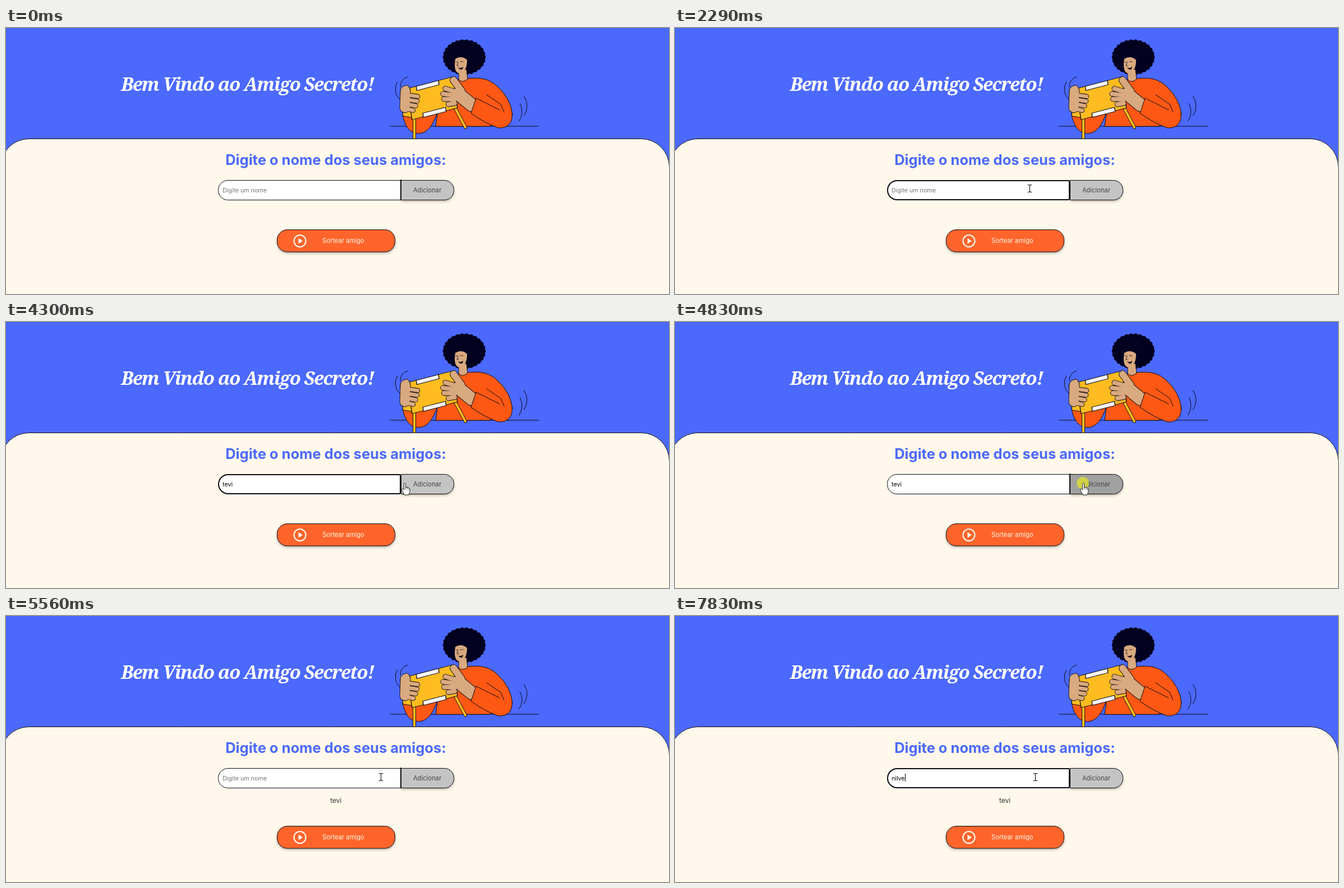
These frames come from a looping animation (1182 px wide and 474 px high, 8000 ms). An HTML page with a canvas:

```html
<!DOCTYPE html>
<html lang="pt-BR">
<head>
<meta charset="utf-8">
<title>Amigo Secreto</title>
<style>
html, body { margin: 0; width: 100%; height: 100%; overflow: hidden; background: #4b69fd; }
canvas { display: block; }
</style>
</head>
<body>
<canvas id="stage" width="1182" height="474"></canvas>
<script>
const ctx = document.getElementById('stage').getContext('2d');
const LOOP = 8000, TICK = 200 / 3;
const INK = '#0b0a14', SKIN = '#d9a97f', ORANGE = '#ff5814', YELLOW = '#ffbc20';
const SANS = 'Inter, "Liberation Sans", sans-serif';

// Pointer glides, each easing out with its own power
const START = { x: 964, y: 447 };
const glides = [
  { from: 460, to: 600, x: 728, y: 373, power: 2 },
  { from: 910, to: 1430, x: 632, y: 286, power: 4 },
  { from: 3940, to: 4500, x: 728, y: 287, power: 2 },
  { from: 5450, to: 5770, x: 642, y: 287, power: 4 }
];
// Each focus lasts until blur; letters follow at a steady gap
const entries = [
  { name: 'tevi', focus: 1800, blur: 4830, keys: 2700, gap: 240 },
  { name: 'nilve', focus: 6210, blur: LOOP, keys: 6970, gap: 215 }
];
const clicks = [
  { from: 1760, to: 1960, x: 632 },
  { from: 4830, to: 4900, x: 727 },
  { from: 6180, to: 6440, x: 641 }
];
const ADDED = 4900;

function pointerAt(t) {
  if (t < glides[0].from) return null;
  const now = Math.floor((t + 8) / TICK) * TICK;
  let { x, y } = START;
  for (const g of glides) {
    const p = Math.min(1, Math.max(0, (now - g.from) / (g.to - g.from)));
    const k = 1 - (1 - p) ** g.power;
    x += (g.x - x) * k;
    y += (g.y - y) * k;
  }
  return { x: Math.round(x), y: Math.round(y) };
}

function path(d, fill, stroke = INK, width = 1) {
  const p = new Path2D(d);
  if (fill) { ctx.fillStyle = fill; ctx.fill(p); }
  if (stroke) { ctx.strokeStyle = stroke; ctx.lineWidth = width; ctx.stroke(p); }
}

function oval(x, y, rx, ry, fill) {
  ctx.fillStyle = fill;
  ctx.beginPath();
  ctx.ellipse(x, y, rx, ry, 0, 0, Math.PI * 2);
  ctx.fill();
}

function text(str, x, y, font, color, align = 'left', spacing = 0) {
  ctx.font = font;
  ctx.fillStyle = color;
  ctx.textAlign = align;
  ctx.letterSpacing = spacing + 'px';
  ctx.fillText(str, x, y);
}

function box(x, y, w, h, radii, fill, line = 1, shadow = false) {
  ctx.beginPath();
  ctx.roundRect(x + line / 2, y + line / 2, w - line, h - line, radii);
  ctx.save();
  if (shadow) {
    ctx.shadowColor = 'rgba(0,0,0,.35)';
    ctx.shadowBlur = 5;
    ctx.shadowOffsetY = 2;
  }
  ctx.fillStyle = fill;
  ctx.fill();
  ctx.restore();
  ctx.strokeStyle = INK;
  ctx.lineWidth = line;
  ctx.stroke();
}

// Round-ended bars that share one outline
function bars(list, color) {
  for (const edge of [1.8, 0]) {
    for (const [x1, y1, x2, y2, w] of list) {
      path(`M${x1} ${y1}L${x2} ${y2}`, null, edge ? INK : color, w + edge);
    }
  }
}

function head() {
  const hair = '#030020', curls = 26;
  oval(817, 52, 36, 30, hair);
  for (let i = 0; i < curls; i++) {
    const a = i / curls * Math.PI * 2;
    oval(817 + 33.5 * Math.cos(a), 52 + 27 * Math.sin(a), 4.8, 4.8, hair);
  }
  path('M807 76V92Q814 99 823 91L821 74Z', SKIN);
  path('M801 55Q797 80 809 81Q822 78 822 57Q812 48 801 55Z', SKIN, null);
  path('M805 70Q810 73 815 69Q814 79 805 70Z', '#190b18', null);
  path('M802 61L805 60M810 60H815M806 61L804 67H807', null, INK, .8);
}

function parcel() {
  bars([[728, 160, 728, 205, 4], [802, 145, 819, 177, 4]], YELLOW);
  path('M703 112L716 105L726 160L708 157Z', YELLOW);
  ctx.save();
  ctx.transform(81, -21, 8, 57, 716, 108);
  const panels = [[0, 0, 1, .97, YELLOW], [.19, 0, .49, .13, '#f6f4f4'], [.25, .86, .5, .13, '#f6f4f4']];
  for (const [x, y, w, h, fill] of panels) path(`M${x} ${y}h${w}v${h}h${-w}Z`, fill, INK, .016);
  ctx.restore();
}

function hands() {
  const left = [[712, 112, 711, 142, 17], [711, 116, 714, 107, 9]];
  const right = [[807, 118, 830, 137, 23], [812, 112, 798, 93, 12]];
  for (let i = 0; i < 4; i++) {
    const y = 122 + i * 8.3;
    left.push([714, y - 3, 734 - i * i * .9, y, 6.8]);
    right.push([800, 113 + i * 7, 779 + (i - 1.2) ** 2 * 3, 108 + i * 9.3, 7.8]);
  }
  bars(left, SKIN);
  bars(right, SKIN);
}

function drummer() {
  ctx.lineJoin = ctx.lineCap = 'round';
  path('M685 175H950', null);
  path('M766 175L770 145L798 96Q806 90 824 90C850 87 864 93 876 104Q900 126 903 155L862 175Z', ORANGE);
  path('M707 155C713 182 724 188 737 188Q758 186 769 150L725 153Z', ORANGE);
  head();
  parcel();
  hands();
  path('M838 125L882 145L902 152C904 170 893 179 878 178Q856 171 829 152Z', ORANGE, null);
  path('M902 152C904 170 893 179 878 178Q856 171 829 152L838 125L880 146M857 119L882 136L888 150', null);
  // Rattle marks
  const marks = [[718, 109, 24, 2.3, 3.7], [719, 103, 16, 3, 4.5], [899, 139, 30, -.6, .6], [890, 149, 30, -.5, .6]];
  for (const [x, y, r, a, b] of marks) {
    ctx.beginPath();
    ctx.arc(x, y, r, a, b);
    ctx.stroke();
  }
}

function form(t) {
  const entry = entries[t < ADDED ? 0 : 1];
  const focused = t >= entry.focus && t < entry.blur;
  const pressed = t >= entries[0].blur && t < ADDED;
  box(704, 271, 95, 36, [0, 17, 17, 0], pressed ? '#a1a1a1' : '#c4c4c4', 1, true);
  box(378, 271, 326, 36, focused ? [17, 2, 2, 17] : [17, 0, 0, 17], '#fff', focused ? 2 : 1);
  if (!focused) path('M704 271V306', null, INK, 2);
  text('Adicionar', 751, 293, '11.2px ' + SANS, '#444', 'center');

  const count = Math.max(0, Math.min(entry.name.length, Math.floor((t - entry.keys) / entry.gap) + 1));
  const typed = entry.name.slice(0, count);
  text(typed || 'Digite um nome', 386, 293, '10.67px ' + SANS, typed ? '#000' : '#757575');
  const lastInput = count ? entry.keys + (count - 1) * entry.gap : entry.focus;
  if (focused && (t - lastInput) % 1000 < 490) {
    const w = typed ? ctx.measureText(typed).width : 0;
    ctx.fillStyle = '#000';
    ctx.fillRect(Math.round(386 + w), 281, 1, 14);
  }
}

function drawButton(y) {
  const cream = '#fff8f2';
  box(483, y, 211, 40.5, 18, '#ff652b', 1, true);
  path(`M534.5 ${y + 20.5}a10.5 10.5 0 1 0 -21 0a10.5 10.5 0 1 0 21 0`, null, cream, 2.2);
  path(`M521.5 ${y + 15.5}v10l7.5 -5Z`, cream, null);
  text('Sortear amigo', 564, y + 24, '11.2px ' + SANS, '#fff8eb');
}

function cursor(at) {
  const inRow = at.y > 271 && at.y < 307;
  ctx.save();
  ctx.translate(at.x, at.y);
  if (inRow && at.x < 704) {
    path('M-3 -6.5H-1L.5 -5.5L2 -6.5H4M.5 -5.5V5.5M-3 6.5H-1L.5 5.5L2 6.5H4', null, '#111', 1.1);
  } else if (inRow) {
    path('M-1.5 1Q0 -1 1.5 1V8Q7 6 9 11V15L7 21H-1L-5 13Q-6 10 -3.5 10L-1.5 12Z', '#fff', '#222');
    path('M1.5 8V11M4.5 8.5V11M7 9.5V12', null, '#222', .8);
  } else {
    path('M.5 .5V15.5L4 12.2L6.2 17L8.5 16L6.3 11.3H11Z', '#fff', '#111');
  }
  ctx.restore();
}

function render(t) {
  ctx.fillStyle = '#4b69fd';
  ctx.fillRect(0, 0, 1182, 474);
  text('Bem Vindo ao Amigo Secreto!', 205, 112, 'italic 700 33px "Noto Serif", serif', '#fff', 'left', -1.55);
  drummer();
  box(-10, 197, 1193, 400, 50, '#fff8eb');
  text('Digite o nome dos seus amigos:', 588, 243.5, '700 25.5px ' + SANS, '#4b69fd', 'center');
  form(t);
  const added = t >= ADDED;
  if (added) text(entries[0].name, 588, 333, '12px ' + SANS, '#333', 'center');
  drawButton(added ? 374 : 359);
  const click = clicks.find(c => t >= c.from && t < c.to);
  if (click) oval(click.x, 287, 10.8, 10.8, 'rgba(222,222,50,.8)');
  const at = pointerAt(t);
  if (at) cursor(at);
}

function tick(now) {
  render(now % LOOP);
  requestAnimationFrame(tick);
}
requestAnimationFrame(tick);
</script>
</body>
</html>
```
